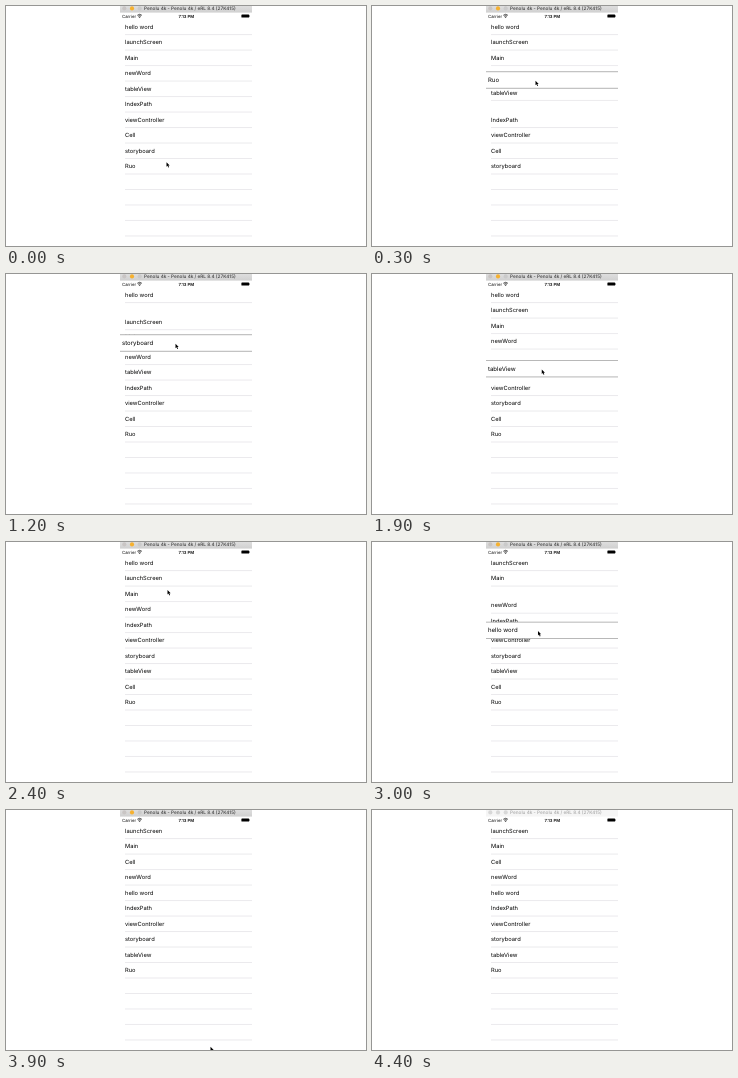
Write an HTML page that moves like this. It is 360 by 240 pixels and loops after 4.7 s.

```html
<!DOCTYPE html>
<html lang="en">
<head>
<meta charset="utf-8">
<title>Reordering list</title>
<style>
html, body { margin: 0; width: 100%; height: 100%; overflow: hidden; background: #fff; }
svg { display: block; width: 360px; height: 240px; }
text { font-family: Inter, Roboto, sans-serif; text-rendering: geometricPrecision; fill: #000; }
.row text { font-size: 5.75px; }
.row line, #blank line { stroke: #d2d1d6; stroke-width: .45; }
.row rect { display: none; fill: #fff; stroke: #a4a4a4; stroke-width: .6; }
.lift rect { display: block; filter: drop-shadow(0 .2px .6px rgba(0, 0, 0, .3)); }
.lift line { display: none; }
#title text { font-size: 4.7px; font-weight: 500; fill: #3c3c3c; }
#title.idle .bar { fill: #f5f5f5; }
#title.idle text { fill: #a9a9a9; }
#title.idle circle { fill: #d8d8d8; }
.status { font-size: 4.3px; }
.clock { font-size: 4.2px; font-weight: 600; text-anchor: middle; }
</style>
</head>
<body>
<svg viewBox="0 0 360 240">
  <defs>
    <linearGradient id="metal" x2="0" y2="1">
      <stop stop-color="#dedede"/><stop offset="1" stop-color="#d0d0d0"/>
    </linearGradient>
    <clipPath id="screen"><rect x="114" width="132" height="240"/></clipPath>
  </defs>
  <g clip-path="url(#screen)">
    <g id="blank"></g>
    <g id="list"></g>
    <g id="title">
      <rect class="bar" x="114" width="132" height="6.6" fill="url(#metal)"/>
      <circle cx="118.3" cy="2.4" r="2.1" fill="#c9c5c4"/>
      <circle cx="126" cy="2.4" r="2.1" fill="#f6b12f"/>
      <circle cx="133.7" cy="2.4" r="2.1" fill="#cacaca"/>
      <text x="138" y="4.4">Penolu 4k - Penolu 4k / eRL 8.4 (27K415)</text>
    </g>
    <text class="status" x="116" y="11.7">Carrier</text>
    <g fill="none" stroke="#000" stroke-width=".7">
      <path d="M131.3 9.3Q133.6 7.3 135.9 9.3M132.2 10.3Q133.6 9.1 135 10.3"/>
      <circle cx="133.6" cy="11.2" r=".3"/>
    </g>
    <text class="clock" x="180.3" y="11.6">7:13 PM</text>
    <rect x="235.4" y="8.4" width="7.8" height="3.2" rx=".7"/>
    <rect x="243.4" y="9.4" width=".6" height="1.2" rx=".3"/>
    <path id="pointer" d="M-.5 .7V5.3L.5 4.3L1.3 6.1L2.1 5.7L1.3 4H2.7Z"
          stroke="#fff" stroke-width=".4" paint-order="stroke"/>
  </g>
</svg>
<script>
const LOOP = 4700, STEP = 100;
const TOP = 13.1, ROW = 15.49, MID = 180;
const names = ["hello word", "launchScreen", "Main", "newWord", "tableView",
  "IndexPath", "viewController", "Cell", "storyboard", "Ruo"];

// Turning points of the pointer: step, x, y
const turns = [
  [0, 161, 155.5], [3, 164, 74], [5, 166, 157], [8, 167, 142.3],
  [10, 169, 40], [11, 170, 42], [12, 170, 69], [14, 170, 133],
  [16, 170, 84], [17, 170, 84], [23, 171, 125.5], [24, 162, 47.3],
  [26, 165, 24], [28, 165, 23.4], [31, 167, 111], [32, 166, 70],
  [35, 151, 144.8], [37, 152, 56], [39, 205, 236]
];
const drags = [
  { name: "Ruo", from: 1, to: 5, lift: true },
  { name: "storyboard", from: 9, to: 14, lift: true },
  { name: "tableView", from: 18, to: 22, lift: true },
  { name: "hello word", from: 28, to: 32, lift: true },
  { name: "Cell", from: 36, to: 37, lift: false }
];
const POINTER_GONE = 42, WINDOW_IDLE = 43;

const byId = id => document.getElementById(id);
const list = byId("list"), pointer = byId("pointer");

function add(parent, tag, attrs) {
  const el = document.createElementNS("http://www.w3.org/2000/svg", tag);
  for (const key in attrs) el.setAttribute(key, attrs[key]);
  return parent.appendChild(el);
}

const rowY = i => TOP + ROW * (i + .5);
const ease = u => u * u * (3 - 2 * u);

function pointerAt(step) {
  const next = turns.findIndex(turn => turn[0] > step);
  const i = next < 0 ? turns.length - 1 : next;
  const [start, x, y] = turns[i - 1], [end, x2, y2] = turns[i];
  const u = ease(Math.min(1, (step - start) / (end - start)));
  return { x: x + (x2 - x) * u, y: y + (y2 - y) * u };
}

const cells = {};
for (const name of names) {
  const g = cells[name] = add(list, "g", { class: "row" });
  add(g, "rect", { x: -66, y: -ROW / 2, width: 132, height: ROW });
  add(g, "text", { x: -61, y: 1.9 }).textContent = name;
  add(g, "line", { x1: -61, x2: 66, y1: ROW / 2, y2: ROW / 2 });
}
for (let i = names.length; i < 14; i++) {
  const y = TOP + ROW * (i + 1);
  add(byId("blank"), "line", { x1: 119, x2: 246, y1: y, y2: y });
}

// Replays the drags up to a step; displaced rows start slowly, then snap home.
function layout(last) {
  const order = [...names], y = {};
  names.forEach((name, i) => y[name] = rowY(i));
  let drag;
  for (let step = 0; step <= last; step++) {
    const before = [...order];
    drag = drags.find(d => step >= d.from && step <= d.to);
    const held = drag && pointerAt(step).y;
    if (drag) {
      order.splice(order.indexOf(drag.name), 1);
      order.splice(Math.floor((held - TOP) / ROW), 0, drag.name);
    }
    order.forEach((name, i) => {
      const moved = before[i] !== name;
      y[name] += (rowY(i) - y[name]) * (moved ? .25 : 1);
    });
    if (drag) y[drag.name] = held;
  }
  return { y, drag };
}

function draw(step) {
  const { y, drag } = layout(step);
  for (const name of names) {
    const g = cells[name], held = drag && drag.name === name;
    const lift = Boolean(held && drag.lift);
    g.classList.toggle("lift", lift);
    g.setAttribute("transform", `translate(${MID} ${y[name]}) scale(${lift ? 1.05 : 1})`);
    if (held) list.append(g);
  }
  const p = pointerAt(step);
  pointer.setAttribute("transform", `translate(${p.x} ${p.y})`);
  pointer.style.display = step < POINTER_GONE ? "" : "none";
  byId("title").classList.toggle("idle", step >= WINDOW_IDLE);
}

let shown = -1;
function tick() {
  const step = Math.floor(performance.now() % LOOP / STEP);
  if (step !== shown) draw(shown = step);
  requestAnimationFrame(tick);
}
tick();
</script>
</body>
</html>
```
